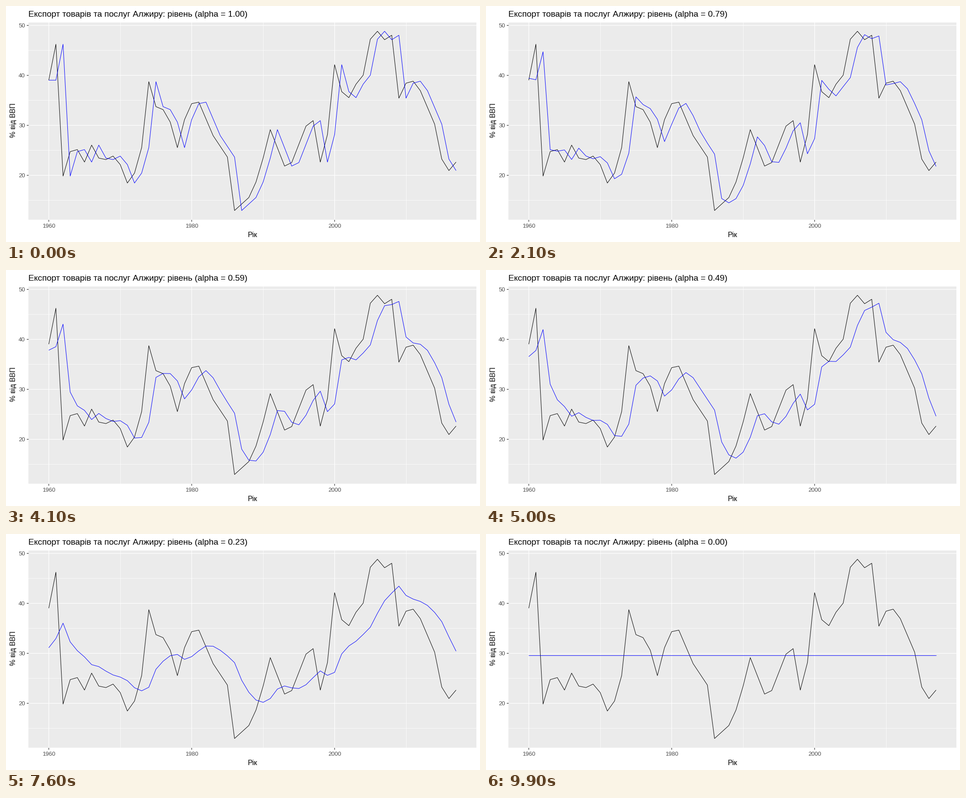
Recreate the animation shown at these times as a matplotlib script. Size 1058 px wide and 529 px high, loop 10000 ms.

```python
import numpy as np
import matplotlib.pyplot as plt
from matplotlib.animation import FuncAnimation

W, H, DPI = 1058, 529, 64
FRAMES, INTERVAL = 100, 100
LEFT, RIGHT, TOP, BOTTOM = 50, 1050, 36.5, 478.5  # panel, pixels from top left
TICK = 4

plt.rcParams["font.family"] = "Liberation Sans"


def px(n):
    """Pixels to points."""
    return n * 72 / DPI


def fill(values):
    """Put the open years on straight lines between their neighbours."""
    values = np.array(values)
    years = np.arange(len(values))
    known = ~np.isnan(values)
    return np.interp(years, years[known], values[known])


def padded(values):
    lo, hi = values.min(), values.max()
    pad = (hi - lo) / 20
    return lo - pad, hi + pad


def smooth(alpha):
    """Simple exponential smoothing with the least-squares initial level."""
    base = np.zeros(len(exports))
    for t, value in enumerate(exports[:-1]):
        base[t + 1] = alpha * value + (1 - alpha) * base[t]
    weight = (1 - alpha) ** np.arange(len(exports))
    start = weight @ (exports - base) / (weight @ weight)
    return base + start * weight


_ = np.nan
exports = fill([
    39, 46.2, 19.8, 24.7, 25.1, 22.6, 26, 23.4, 23.1, 23.8,
    22.1, 18.4, 20.4, 25.5, 38.7, 33.7, 33.1, 30.6, 25.5, 31.1,
    34.3, 34.6, _, 27.9, _, 23.6, 12.9, _, 15.5, 18.6,
    23.4, 29.1, _, 21.8, 22.5, _, 29.8, 30.9, 22.6, 28.1,
    42.1, 36.7, 35.5, 38.2, 40, 47.2, 48.8, 47.1, 48, 35.4,
    38.4, 38.8, 36.9, _, 30.2, 23.2, 20.9, 22.6])
years = 1960 + np.arange(len(exports))

fig = plt.figure(figsize=(W / DPI, H / DPI), dpi=DPI, facecolor="white")
ax = fig.add_axes([LEFT / W, 1 - BOTTOM / H,
                   (RIGHT - LEFT) / W, (BOTTOM - TOP) / H],
                  facecolor="#EBEBEB")
x_lim, y_lim = padded(years), padded(exports)
ax.set(xlim=x_lim, ylim=y_lim, xticks=[], yticks=[])
ax.spines[:].set_visible(False)


def write(x, y, text, size, **style):
    style = {"ha": "center", "va": "baseline",
             "rotation_mode": "anchor", **style}
    return fig.text(x / W, 1 - y / H, text, fontsize=px(size), **style)


def tick(xs, ys):
    fig.add_artist(plt.Line2D(np.array(xs) / W, 1 - np.array(ys) / H,
                              color="#333333", lw=px(1.3),
                              solid_capstyle="butt"))


def grid(draw, places, width):
    for place in places:
        draw(place, color="white", lw=px(width), zorder=width)


def curve(color):
    return ax.plot(years, exports, color=color, lw=px(1), zorder=3,
                   solid_joinstyle="round", solid_capstyle="butt")[0]


decades, tens = range(1960, 2001, 20), range(20, 51, 10)
grid(ax.axvline, [d + 10 for d in decades], 0.7)
grid(ax.axhline, [t - 5 for t in tens], 0.7)
grid(ax.axvline, decades, 1.3)
grid(ax.axhline, tens, 1.3)

for year in decades:
    x = np.interp(year, x_lim, (LEFT, RIGHT))
    tick([x, x], [BOTTOM, BOTTOM + TICK])
    write(x, 497, str(year), 13, color="#4D4D4D")
for value in tens:
    y = np.interp(value, y_lim, (BOTTOM, TOP))
    tick([LEFT - TICK, LEFT], [y, y])
    write(42.5, y + 5, str(value), 13, color="#4D4D4D", ha="right")

write((LEFT + RIGHT) / 2, 518, "Рік", 16)
write(21, (TOP + BOTTOM) / 2 - 1, "% від ВВП", 16, rotation=90)
title = write(LEFT, 24, "", 19, ha="left")
curve("black")
level = curve("blue")


def update(i):
    alpha = 1 - i / (FRAMES - 1)
    level.set_ydata(smooth(alpha))
    title.set_text("Експорт товарів та послуг Алжиру: рівень "
                   f"(alpha = {alpha:.2f})")
    return level, title


anim = FuncAnimation(fig, update, frames=FRAMES, interval=INTERVAL,
                     repeat=True, repeat_delay=0)
plt.show()
```
